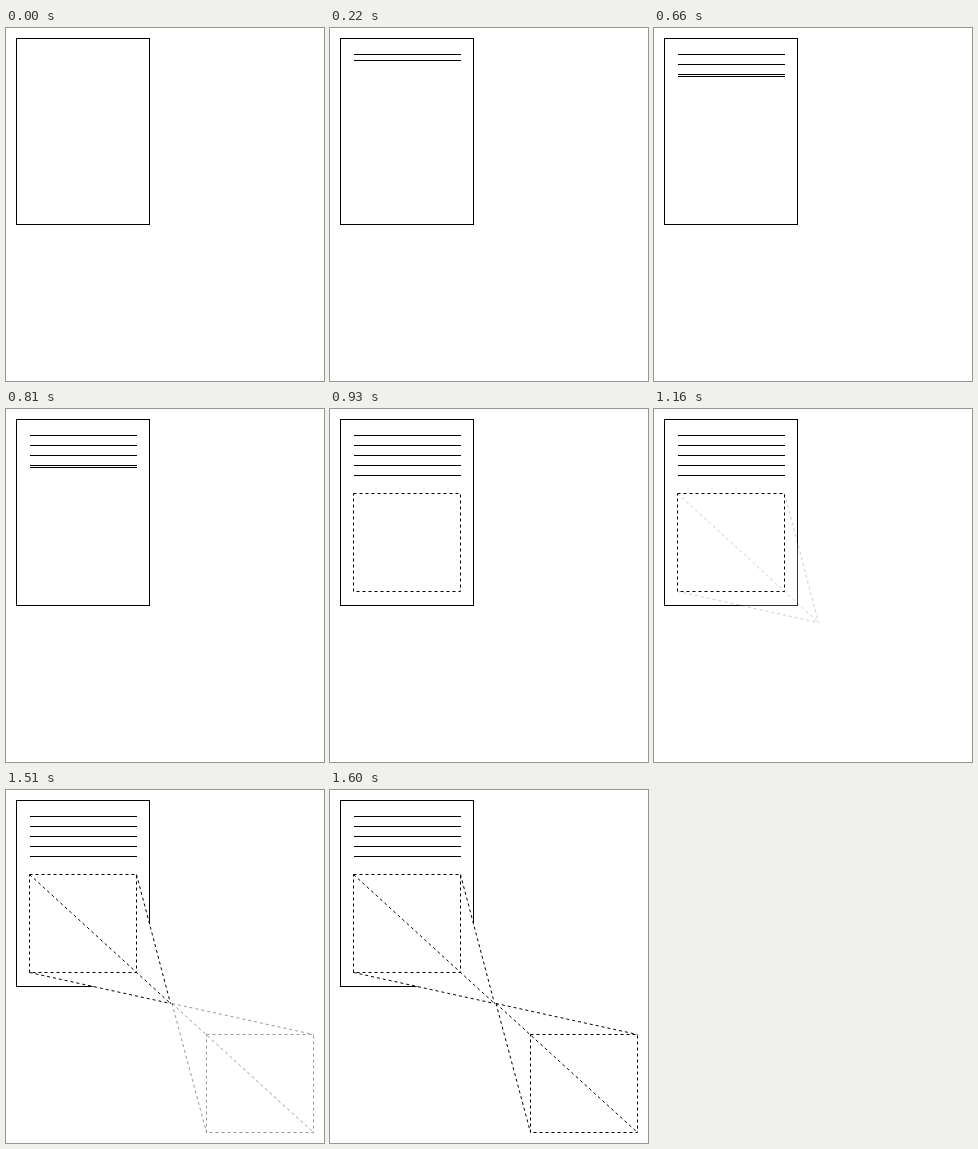
Write an HTML page with a canvas that moves like this. It is 318 px wide and 353 px high and loops after 2230 ms.

```html
<!DOCTYPE html>
<html lang="en">
<head>
<meta charset="utf-8">
<title>Page projection</title>
<style>
html, body { margin: 0; width: 100%; height: 100%; overflow: hidden; background: #fff; }
canvas { display: block; }
</style>
</head>
<body>
<canvas id="stage" width="318" height="353"></canvas>
<script>
const ctx = document.getElementById('stage').getContext('2d');
const LOOP = 2230, TICK = 30, DASH = [3, 3];

// Each slide moves the newest rule down 2px per tick.
const slides = [
  { at: 130, from: 26, to: 36 },
  { at: 440, from: 38, to: 46 },
  { at: 660, from: 48, to: 56 },
  { at: 810, from: 58, to: 66 }
];

const ticks = (t, start) => Math.floor((t - start) / TICK);
const fade = (t, start) => Math.max(0, Math.min(1, (ticks(t, start) + 1) / 5));

function ruleY(t) {
  const s = slides.filter(s => t >= s.at).pop();
  return s ? Math.min(s.to, s.from + 2 * ticks(t, s.at)) : 0;
}

function drawRules(t) {
  const y = ruleY(t);
  for (let fixed = 26; fixed < y; fixed += 10) ctx.fillRect(24, fixed, 107, 1);
  if (y) ctx.fillRect(24, y, 107, 1);
}

function dashedLine(x1, y1, x2, y2) {
  ctx.beginPath();
  ctx.moveTo(x1, y1);
  ctx.lineTo(x2, y2);
  ctx.stroke();
}

function drawUpperRays() {
  ctx.fillStyle = '#fff';
  ctx.beginPath();
  ctx.moveTo(23.5, 182.5);
  ctx.lineTo(130.5, 84.5);
  ctx.lineTo(164.5, 213.5);
  ctx.fill();
  dashedLine(23.5, 84.5, 164.5, 213.5);
  dashedLine(130.5, 84.5, 164.5, 213.5);
  dashedLine(23.5, 182.5, 164.5, 213.5);
}

function drawLowerRays() {
  dashedLine(166, 213.5, 307.5, 342.5);
  dashedLine(166, 213.5, 307.5, 244.5);
  dashedLine(166, 213.5, 200.5, 342.5);
  ctx.strokeRect(200.5, 244.5, 107, 98);
}

function draw(t) {
  ctx.globalAlpha = 1;
  ctx.fillStyle = '#fff';
  ctx.fillRect(0, 0, 318, 353);
  ctx.fillStyle = ctx.strokeStyle = '#000';
  ctx.lineWidth = 1;
  ctx.setLineDash([]);
  ctx.strokeRect(10.5, 10.5, 133, 186);
  drawRules(t);

  ctx.setLineDash(DASH);
  ctx.globalAlpha = fade(t, 1160);
  if (t >= 1160) drawUpperRays();
  ctx.globalAlpha = 1;
  if (t >= 930) ctx.strokeRect(23.5, 84.5, 107, 98);
  ctx.globalAlpha = fade(t, 1480);
  if (t >= 1480) drawLowerRays();
}

const start = performance.now();
function loop() {
  draw((performance.now() - start) % LOOP);
  requestAnimationFrame(loop);
}
loop();
</script>
</body>
</html>
```
